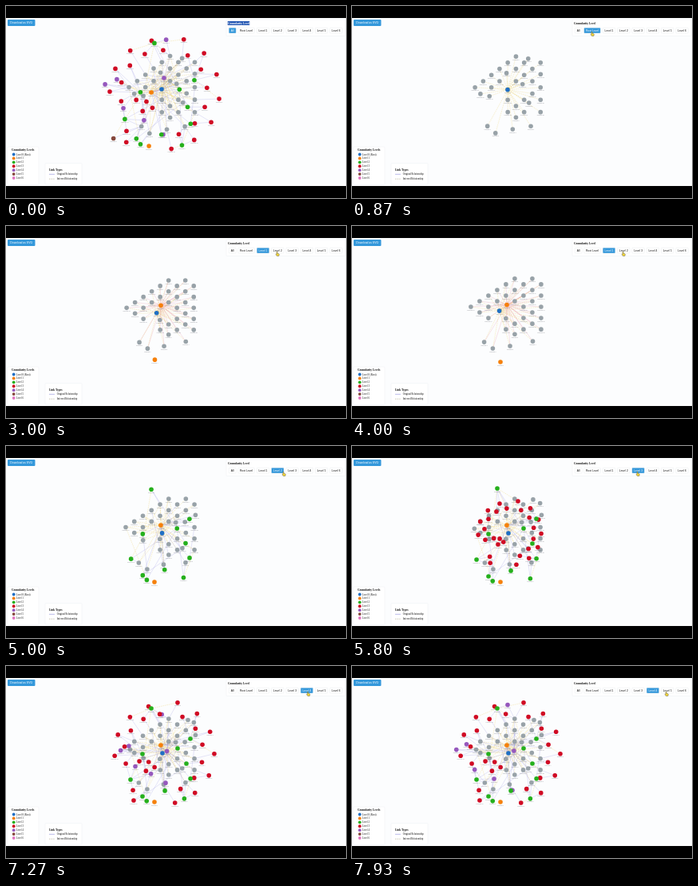
Animation, 426 px wide and 240 px high, one loop 8 s. Source, as an HTML page with a canvas:

```html
<!DOCTYPE html>
<html lang="en">
<head>
<meta charset="utf-8">
<title>Granularity graph</title>
<style>
  html, body { margin: 0; width: 100%; height: 100%; overflow: hidden; background: #000; }
  canvas, svg { position: absolute; left: 0; top: 0; width: 426px; height: 240px; }
  text { font-family: "Liberation Serif", serif; font-size: 3px; fill: #111; }
  .title { font-weight: bold; font-size: 3.5px; }
  .sans { font-family: "Liberation Sans", sans-serif; font-size: 3.4px; text-anchor: middle; }
  .panel { fill: #fff; stroke: #eceef2; stroke-width: .5; }
</style>
</head>
<body>
<canvas></canvas>
<svg viewBox="0 0 426 240">
  <rect x="2" y="17" width="34.5" height="8" rx="1" fill="#3498db"/>
  <text class="sans" x="19.2" y="22.2" style="fill:#fff">Download as SVG</text>
  <rect class="panel" x="276" y="17" width="149" height="20.5" rx="1"/>
  <rect id="selection" x="277.7" y="19" width="27.5" height="5" fill="#2457b3"/>
  <text id="heading" class="title" x="278" y="23">Granularity Level</text>
  <g id="buttons"></g>
  <rect class="panel" x="2" y="176" width="39" height="47.5" rx="1"/>
  <text class="title" x="7" y="181">Granularity Levels</text>
  <g id="levels"></g>
  <rect class="panel" x="49" y="196.5" width="46" height="26.5" rx="1"/>
  <text class="title" x="54" y="205.8">Link Types</text>
  <path d="M54 210.3h7" stroke="#8b8bd8" stroke-width=".6"/>
  <path d="M54 216.2h7" stroke="#aaa58a" stroke-width=".6" stroke-dasharray="1 .6"/>
  <text x="63.8" y="211.3">Original Relationship</text>
  <text x="63.8" y="217.2">Inferred Relationship</text>
  <path id="cursor" d="M-1-2.5q.6-.7 1.1 0v1.7l1.9.6q.5.2.4 1l-.5 1.7h-2.5l-1.5-2q.2-.7 1.1 0z"
        fill="#f5d838" stroke="#444" stroke-width=".4"/>
</svg>
<script>
const DURATION = 8000, STEP = 1000 / 15, ENTER_TAU = 200;
const COLORS = ['#1f6fc4', '#f5800c', '#25b01c', '#d00b24', '#9658bd', '#85483c', '#e377c2'];
const GREY = '#98a2a8', VIOLET = 'rgba(115,105,215,.34)', YELLOW = 'rgba(232,190,50,.5)',
      PINK = 'rgba(225,120,140,.4)';
const MIDDLE = [199, 100], RING_CENTRE = [196, 108];

const $ = id => document.getElementById(id);
const lerp = (a, b, k) => a + (b - a) * k;
const mix = (a, b, k) => [lerp(a[0], b[0], k), lerp(a[1], b[1], k)];
const dist = (a, b) => Math.hypot(a[0] - b[0], a[1] - b[1]);
const nearest = (list, p) => list.reduce((best, q) => dist(q, p) < dist(best, p) ? q : best);
const polar = (degrees, r) => {
  const a = degrees * Math.PI / 180;
  return [RING_CENTRE[0] + r * Math.cos(a), RING_CENTRE[1] + r * Math.sin(a)];
};
// An arc of nodes whose radius alternates around r.
const arc = (n, from, to, r, zigzag) => Array.from({length: n}, (_, i) =>
  polar(lerp(from, to, i / (n - 1)), r + (i % 2 ? -zigzag : zigzag)));

// Moves p out of the way of the given nodes.
const apart = (p, nodes, gap) => nodes.reduce((at, q) => {
  const d = dist(at, q) || 1;
  return d < gap ? mix(q, at, gap / d) : at;
}, p);

// Concepts sit on a staggered lattice, pointed at the left, with some hanging below.
function concepts() {
  const hubs = [[194, 99], [184, 105], [203, 106]];
  const nodes = [[204, 135], [165, 145], [176, 153], [198, 150], [227, 144]];
  for (let row = 0; row < 10; row++) {
    const left = row > 7 ? -1 : Math.abs(row - 5) - 5;
    for (let col = left; col <= 3; col++) {
      const p = [204 + 11.2 * col, 65 + 7.1 * row];
      if ((row + col) % 2 === 0 && hubs.every(h => dist(h, p) > 6)) nodes.push(p);
    }
  }
  return nodes;
}
const CONCEPTS = concepts();

// Nodes of each level, apart from the hubs.
const OUTER = [
  [],
  [[186, 170]],
  [[215, 103], [231, 91], [182, 53], [171, 110], [226, 122],
    ...arc(4, 43, 108, 56, -8), [171, 163], [156, 142]],
  [...arc(13, -73, 76, 58, 7), ...arc(9, 163, 266, 54, -6), ...arc(2, 121, 128, 65, 5),
    ...arc(4, 159, 118, 26, 5)],
  [[195, 48], ...arc(2, 183, 191, 60, 6), ...arc(3, 153, 84, 43, 5)],
  [[145, 165]]
];

// hubs: first node of a level; scale: of the concepts; spread and turn: of the other nodes.
function stage(start, tau, depth, hubs, centre, scale, spread = 1, turn = 0) {
  const place = p => {
    const [dx, dy] = [p[0] - RING_CENTRE[0], p[1] - RING_CENTRE[1]];
    return polar(Math.atan2(dy, dx) * 180 / Math.PI + turn, Math.hypot(dx, dy) * spread);
  };
  const levels = OUTER.slice(0, depth).map((list, l) =>
    [...(hubs[l] ? [hubs[l]] : []), ...list.map(place)]);
  const grey = CONCEPTS.map(p => apart(
    [0, 1].map(axis => centre[axis] + (p[axis] - MIDDLE[axis]) * scale[axis]), levels.flat(), 8));
  return {start, tau, grey, levels};
}
const denseHubs = {0: [196, 109], 1: [194, 99], 4: [203, 106]};
const dense = (start, depth) => stage(start, 220, depth, denseHubs, [199, 101], [.96, 1]);
const STAGES = [
  stage(0, 1, 6, {0: [195, 104], 1: [182, 108], 4: [198, 90]}, [201, 101], [.92, 1.1], 1.1, 5),
  stage(850, 230, 1, {0: [195, 113]}, [199, 104], [.87, .93]),
  stage(2400, 800, 2, {0: [183, 105], 1: [194, 98.5]}, MIDDLE, [1, 1]),
  dense(4250, 3), dense(5600, 4), dense(6950, 5)
];

function layoutAt(t) {
  let {grey, levels} = STAGES[0], current = 0;
  for (let i = 1; i < STAGES.length && t >= STAGES[i].start; i++) {
    const s = STAGES[i], before = levels, origin = levels[0][0];
    const elapsed = Math.min(t, STAGES[i + 1]?.start ?? DURATION) - s.start;
    const ease = tau => 1 - Math.exp(-elapsed / tau);
    grey = s.grey.map((p, j) => mix(grey[j], p, ease(s.tau)));
    levels = s.levels.map((list, l) => list.map((p, j) => before[l]
      ? mix(before[l][j], p, ease(s.tau))
      : mix(origin, p, ease(ENTER_TAU))));
    current = i;
  }
  return {grey, levels, current};
}

const canvas = document.querySelector('canvas'), ctx = canvas.getContext('2d');
const ratio = window.devicePixelRatio || 1;
canvas.width = 426 * ratio;
canvas.height = 240 * ratio;
ctx.scale(ratio, ratio);

function link(a, b, color) {
  ctx.strokeStyle = color;
  ctx.setLineDash(color === YELLOW ? [1.5, 1] : []);
  ctx.beginPath();
  ctx.moveTo(...a);
  ctx.lineTo(...b);
  ctx.stroke();
}

function drawLinks({grey, levels, current}) {
  const root = levels[0][0], hub = levels[1]?.[0], second = levels[4]?.[0];
  ctx.lineWidth = .5;
  grey.forEach((p, i) => {
    if (current < 3 || i % 2) link(root, p, YELLOW);
    if (hub) link(hub, p, current === 2 ? PINK : i % 4 ? YELLOW : VIOLET);
    if (second) link(second, p, i % 2 ? VIOLET : YELLOW);
  });
  if (hub) link(hub, root, PINK);
  levels.slice(2).forEach((list, l) => list.forEach((p, i) => {
    link(p, nearest(grey, p), VIOLET);
    if (l === 0) {
      link(p, i % 2 ? hub : list[0], VIOLET);
      link(p, grey[(i * 11 + 5) % grey.length], i % 2 ? VIOLET : YELLOW);
    } else {
      link(p, nearest(levels[2], p), i % 3 ? VIOLET : YELLOW);
    }
  }));
}

function drawNode([x, y], color, label) {
  ctx.fillStyle = color;
  ctx.beginPath();
  ctx.arc(x, y, 2.8, 0, 7);
  ctx.fill();
  ctx.fillStyle = 'rgba(70,70,80,.6)';
  ctx.fillText(label, x, y + 4.6);
}

function drawGraph(layout) {
  ctx.fillStyle = '#000';
  ctx.fillRect(0, 0, 426, 240);
  ctx.fillStyle = '#fcfdfe';
  ctx.fillRect(0, 15, 426, 210);
  drawLinks(layout);
  ctx.font = '1.8px "Liberation Sans", sans-serif';
  ctx.textAlign = 'center';
  layout.grey.forEach((p, i) => drawNode(p, GREY, 'Concept ' + i));
  for (let level = layout.levels.length - 1; level >= 0; level--) {
    layout.levels[level].forEach((p, i) => drawNode(p, COLORS[level], 'Concept ' + i));
  }
}

const names = ['All', 'Root Level', ...[1, 2, 3, 4, 5, 6].map(n => 'Level ' + n)];
$('buttons').innerHTML = names.map((name, i) => {
  const x = [283.7, 301][i] ?? 322 + (i - 2) * 18.3;
  const w = [9, 20.5][i] ?? 15.5;
  return `<rect x="${x - w / 2}" y="27.3" width="${w}" height="6.7" rx=".8" stroke="#e4e7eb" stroke-width=".4"/>
    <text class="sans" x="${x}" y="31.8">${name}</text>`;
}).join('');
$('levels').innerHTML = COLORS.map((color, i) => {
  const y = 185.5 + i * 4.92;
  return `<circle cx="9.7" cy="${y}" r="1.9" fill="${color}"/>
    <text x="12.8" y="${y + 1}">Level ${i}${i ? '' : ' (Root)'}</text>`;
}).join('');
const boxes = document.querySelectorAll('#buttons rect');
const captions = document.querySelectorAll('#buttons text');

// Pointer moves: start, end, x reached.
const MOVES = [[450, 800, 301], [1100, 1700, 318], [2400, 2900, 340], [4350, 5000, 348],
  [5000, 5500, 358], [5800, 6500, 376], [7100, 7800, 394]];

function drawControls(t, selected) {
  boxes.forEach((box, i) => {
    box.style.fill = i === selected ? '#3498db' : '#fff';
    captions[i].style.fill = i === selected ? '#fff' : '#111';
  });
  $('selection').style.display = selected ? 'none' : '';
  $('heading').style.fill = selected ? '#111' : '#fff';

  const x = MOVES.reduce((at, [start, end, to]) => {
    const k = Math.min(1, Math.max(0, (t - start) / (end - start)));
    return lerp(at, to, k * k * (3 - 2 * k));
  }, 290);
  $('cursor').style.display = t < MOVES[0][0] ? 'none' : '';
  $('cursor').setAttribute('transform', `translate(${x} 35)`);
}

function frame() {
  const t = Math.floor(performance.now() % DURATION / STEP) * STEP;
  const layout = layoutAt(t);
  drawGraph(layout);
  drawControls(t, layout.current);
  requestAnimationFrame(frame);
}
frame();
</script>
</body>
</html>
```
